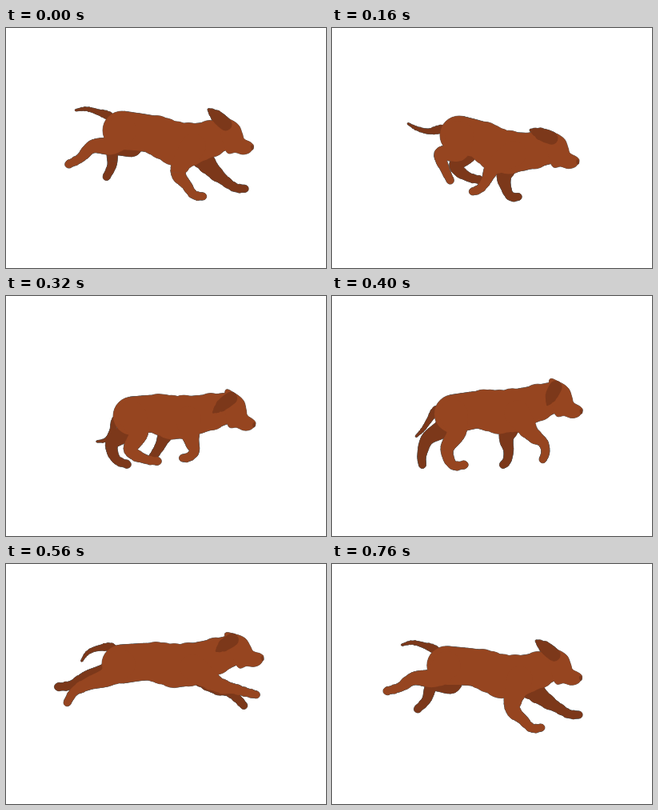
An HTML page that plays this animation: 400 by 300 pixels, repeating every 800 ms.

```html
<!DOCTYPE html>
<html lang="en">
<head>
<meta charset="utf-8">
<title>Running dog</title>
<style>
  html, body { margin: 0; width: 100%; height: 100%; overflow: hidden; background: #fff; }
  svg { display: block; width: 100vw; height: 100vh; }
</style>
</head>
<body>
<svg viewBox="0 0 400 300">
  <use href="#dog" stroke="#55585a" stroke-width="0.9" stroke-linejoin="round"/>
  <g id="dog">
    <g fill="#7c381a">
      <path id="tail"/>
      <path id="farHind"/>
      <path id="farFore"/>
    </g>
    <g fill="#964520">
      <path id="trunk"/>
      <path id="head"/>
      <path id="hind"/>
      <path id="fore"/>
    </g>
    <g fill="#7c381a">
      <path id="ear"/>
      <ellipse id="nose" cx="-2" cy="1.2" rx="1.7" ry="3"/>
    </g>
  </g>
</svg>
<script>
const LOOP = 800, STEP = 40, KEYS = 5, GROUND = 211;

// Every track holds five values, evenly spaced over the loop.
const hip   = { x: [145, 159, 158, 147, 142], y: [128, 134, 150, 136, 122] };
const chest = { x: [222, 215, 216, 221, 222], y: [146, 155, 152, 134, 128] };
const nose  = { x: [309.5, 309, 312, 317.5, 322], y: [148, 166, 160, 125, 121] };
const tilt  = [-4, -3, 4, -10, -10];
const skull = [
  [-41, -38], [-28, -36], [-17, -28], [-13, -17], [-11, -10], [-3, -5],
  [0, 0], [-5, 7], [-14, 9], [-23, 6], [-35, 3]
];

const hindLeg = { bones: [22, 24, 21, 17], radii: [18, 12, 8, 5.5, 4.5] };
const foreLeg = { bones: [34, 21, 14, 11], radii: [16, 9.5, 6, 5, 4.5] };

// Bone angles in degrees from straight down, forward positive; reach scales the bones.
const limbs = {
  hind: { ...hindLeg, reach: [1, 0.93, 1, 1.03, 1], angles: [
    [-35, -3, 20, -12, -72], [-85, -82, -25, -45, -92],
    [-47, 16, 58, -32, -77], [-62, 25, 80, 22, -79]] },
  farHind: { ...hindLeg, reach: [0.95, 0.95, 0.95, 1.05, 1], angles: [
    [28, 22, -32, -53, -67], [-82, -42, -50, -64, -87],
    [-8, 48, 14, -50, -62], [-25, 75, 65, -62, -80]] },
  fore: { ...foreLeg, reach: [1.04, 0.9, 0.73, 1.08, 1.07], angles: [
    [-32, -56, 8, 53, 42], [30, -28, 15, 80, 58],
    [37, -38, -40, 70, 62], [80, -68, -80, 48, 88]] },
  farFore: { ...foreLeg, reach: [1.08, 0.84, 0.9, 0.92, 1.1], angles: [
    [39, -24, -58, 19, 66], [49, 8, -29, 50, 73],
    [57, 30, -32, 27, 63], [84, 80, -35, 0, 80]] },
  tail: { bones: [22, 17, 15, 13], radii: [5, 5, 3.3, 2.2, 1.2], reach: [1, 1, 0.9, 1, 1], angles: [
    [-139, -109, -78, -137, -158], [-112, -82, -22, -68, -109],
    [-105, -103, -34, -48, -90], [-83, -118, -78, -21, -62]] },
  ear: { bones: [13, 15], radii: [8, 7.5, 1.5], reach: [1, 1, 1, 0.75, 1], angles: [
    [-131, -110, -53, -19, -104], [-131, -112, -50, -15, -100]] }
};

const $ = id => document.getElementById(id);
const f = v => v.toFixed(1);
const rad = deg => deg * Math.PI / 180;

// Two ways to blend a track: a two-harmonic wave, or a local cubic.
const wave = x => Math.abs(x) < 1e-6 ? 1 : Math.sin(Math.PI * x) / (KEYS * Math.sin(Math.PI * x / KEYS));
function cubic(x) {
  const a = Math.abs(x);
  if (a < 1) return 1 - 2.5 * a * a + 1.5 * a ** 3;
  return a < 2 ? 2 - 4 * a + 2.5 * a * a - 0.5 * a ** 3 : 0;
}

function sample(track, t, kernel) {
  return track.reduce((sum, v, k) => {
    const x = t / LOOP * KEYS - k;
    return sum + v * kernel(x - KEYS * Math.round(x / KEYS));
  }, 0);
}
const place = (p, t) => [sample(p.x, t, wave), sample(p.y, t, wave)];
const shift = ([x, y], dx, dy) => [x + dx, y + dy];

function chain(root, { bones, angles, reach }, t) {
  const scale = sample(reach, t, cubic), joints = [root];
  bones.forEach((len, i) => {
    const a = rad(sample(angles[i], t, cubic)), [x, y] = joints[i];
    joints.push([x + len * scale * Math.sin(a), Math.min(y + len * scale * Math.cos(a), GROUND)]);
  });
  return joints;
}

function closed(p) {
  const n = p.length, g = i => p[(i + n) % n];
  let d = "M" + p[0].map(f).join(" ");
  for (let i = 0; i < n; i++) {
    const [o, a, b, c] = [g(i - 1), g(i), g(i + 1), g(i + 2)];
    d += "C" + [a[0] + (b[0] - o[0]) / 6, a[1] + (b[1] - o[1]) / 6,
      b[0] - (c[0] - a[0]) / 6, b[1] - (c[1] - a[1]) / 6, b[0], b[1]].map(f).join(" ");
  }
  return d + "Z";
}

// A chain of tapered capsules along a smooth centre line.
function flesh(joints, radii) {
  const q = joints.map((p, i) => [...p, radii[i]]), last = q.length - 1, line = [];
  const at = i => q[Math.max(0, Math.min(i, last))];
  for (let s = 0; s <= last * 8; s++) {
    const i = Math.floor(s / 8), u = s / 8 - i;
    line.push([0, 1, 2].map(k =>
      [-1, 0, 1, 2].reduce((sum, j) => sum + at(i + j)[k] * cubic(u - j), 0)));
  }
  let d = "";
  line.forEach(([x, y, r], i) => {
    const arc = `a${f(r)} ${f(r)} 0 1 0 `;
    d += `M${f(x - r)} ${f(y)}${arc}${f(2 * r)} 0${arc}${f(-2 * r)} 0Z`;
    if (!i) return;
    const [px, py, pr] = line[i - 1], len = Math.hypot(x - px, y - py) || 1;
    const nx = (py - y) / len, ny = (x - px) / len;
    d += "M" + [px + nx * pr, py + ny * pr, x + nx * r, y + ny * r,
      x - nx * r, y - ny * r, px - nx * pr, py - ny * pr].map(f).join(" ") + "Z";
  });
  return d;
}

function draw(t) {
  const rump = place(hip, t), ribs = place(chest, t), tip = place(nose, t);
  const deg = sample(tilt, t, wave), c = Math.cos(rad(deg)), s = Math.sin(rad(deg));
  const onHead = ([u, v]) => shift(tip, u * c - v * s, u * s + v * c);
  const loin = [(rump[0] + ribs[0]) / 2, (rump[1] + ribs[1]) / 2 - 4];
  const shoulder = shift(ribs, 12, 2);

  $("trunk").setAttribute("d", flesh([rump, loin, ribs, onHead([-38, -17])], [24, 23, 26, 19]));
  $("head").setAttribute("d", closed(skull.map(onHead)));
  $("nose").setAttribute("transform", `translate(${tip.map(f)}) rotate(${f(deg)})`);

  const roots = {
    hind: rump, farHind: shift(rump, 3, 2), tail: rump,
    fore: shoulder, farFore: shoulder, ear: onHead([-33, -30])
  };
  for (const id in limbs)
    $(id).setAttribute("d", flesh(chain(roots[id], limbs[id], t), limbs[id].radii));
}

const start = performance.now();
let shown = -1;
function tick() {
  const t = Math.floor((performance.now() - start) % LOOP / STEP) * STEP;
  if (t !== shown) draw(shown = t);
  requestAnimationFrame(tick);
}
tick();
</script>
</body>
</html>
```
